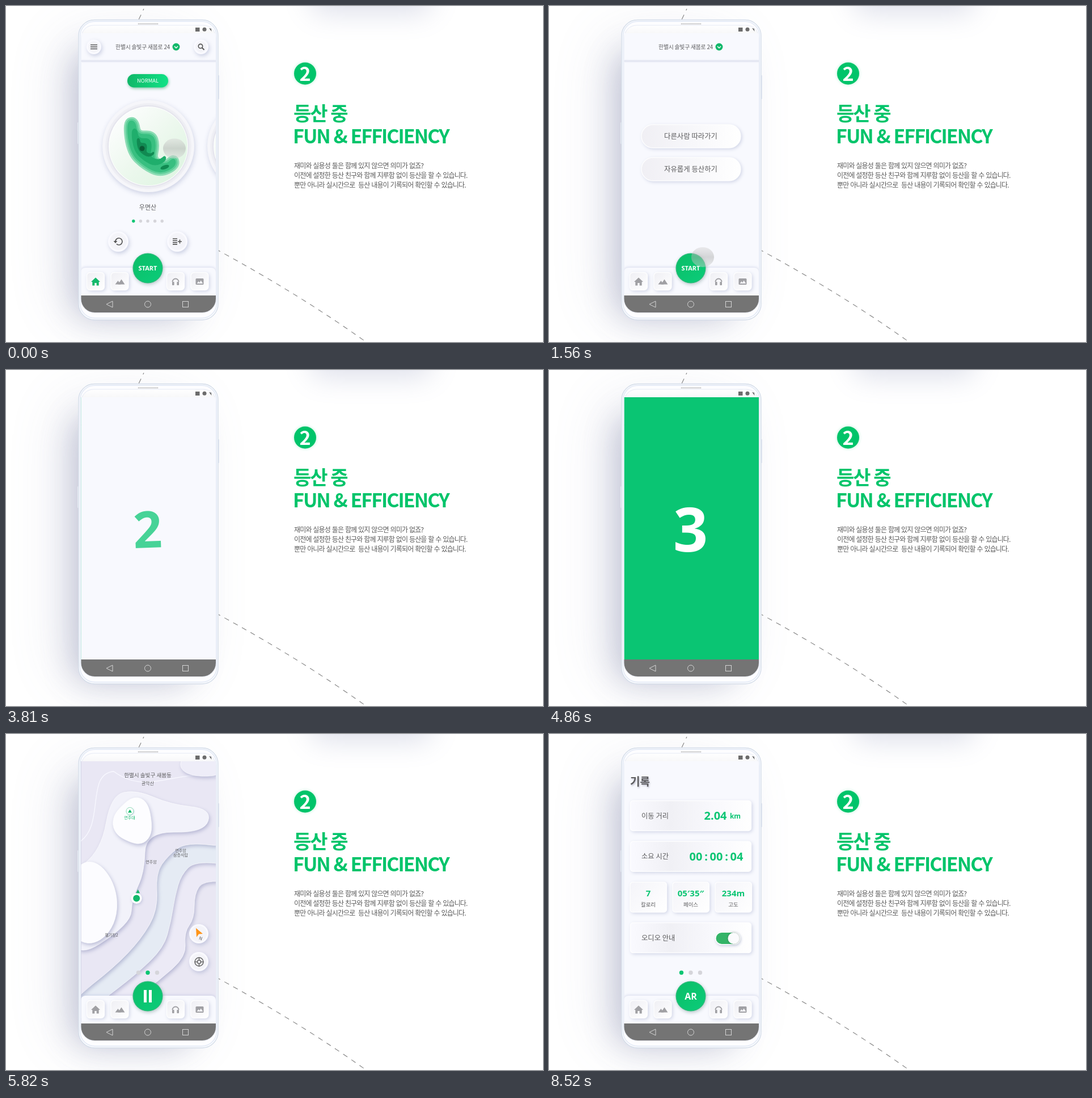
Animation, 947 px wide and 592 px high, one loop 8670 ms. Source, as an HTML page with a canvas:

```html
<!DOCTYPE html>
<html lang="ko">
<head>
<meta charset="utf-8">
<style>
html, body { margin: 0; width: 100%; height: 100%; overflow: hidden; background: #fff; }
canvas { display: block; }
</style>
</head>
<body>
<canvas id="stage" width="947" height="592"></canvas>
<script>
const c = document.getElementById('stage').getContext('2d');
const LOOP = 8670;
const GREEN = '#0ac573', BRAND = '#00c46a', LEAF = '#12b86b';
const GRAY = '#5c5c5e', PALE = '#f8f9fe', ICON = '#a0a0a4', DROP = 'rgba(140,150,190,.42)';
const KR = '"Noto Sans CJK KR", "Noto Sans CJK", sans-serif';
const SANS = '"Noto Sans", sans-serif';
const MID = 250;                                  // centre line of the phone
const VIEW = { x: 132.5, y: 48, w: 237.5, h: 462 };

const clamp = v => Math.max(0, Math.min(1, v));
const span = (t, a, b) => clamp((t - a) / (b - a));
const ease = v => v * v * (3 - 2 * v);
const mix = (a, b, v) => a + (b - a) * v;
const passed = (t, times) => times.filter(x => t >= x).length;

function text(s, x, y, size, color = GRAY, { weight = 400, font = KR, align = 'center', gap = 0, word = 0 } = {}) {
  c.font = `${weight} ${size}px ${font}`;
  c.letterSpacing = gap + 'px';
  c.wordSpacing = word + 'px';
  c.textAlign = align;
  c.fillStyle = color;
  c.fillText(s, x, y + size * 0.37);
}
function shadow(color, blur, dx = 0, dy = 0) {
  c.shadowColor = color; c.shadowBlur = blur; c.shadowOffsetX = dx; c.shadowOffsetY = dy;
}
const noShadow = () => shadow('transparent', 0);
function gradient(x0, y0, x1, y1, ...colors) {
  const g = c.createLinearGradient(x0, y0, x1, y1);
  colors.forEach((col, i) => g.addColorStop(i / (colors.length - 1), col));
  return g;
}
function fill(color) { c.fillStyle = color; c.fill(); }
function stroke(color, width) { c.strokeStyle = color; c.lineWidth = width; c.stroke(); }
function box(x, y, w, h, r, color) { c.beginPath(); c.roundRect(x, y, w, h, r); fill(color); }
function disc(x, y, r, color) { c.beginPath(); c.arc(x, y, r, 0, 7); fill(color); }
function ring(x, y, r, color, width, from = 0, to = 7) { c.beginPath(); c.arc(x, y, r, from, to); stroke(color, width); }
function trace(points) { c.beginPath(); points.forEach(p => c.lineTo(...p)); }
function line(color, width, ...points) { trace(points); stroke(color, width); }
function poly(color, ...points) { trace(points); fill(color); }
function triangle(x, y, w, h, color) { poly(color, [x - w / 2, y + h], [x, y], [x + w / 2, y + h]); }

function raisedBox(x, y, w, h, r, color) {
  shadow(DROP, 6, 2, 2); box(x, y, w, h, r, color); noShadow();
  stroke('rgba(255,255,255,.9)', 1.5);
}
function raisedDisc(x, y, r) {
  shadow(DROP, 7, 2, 3); disc(x, y, r, '#fafaff'); noShadow();
  disc(x, y, r - 3, '#f4f4f9');
}
// Closed curve through the midpoints of a polygon
function smooth(points) {
  const half = i => points[i].map((v, k) => (v + points[(i + 1) % points.length][k]) / 2);
  c.beginPath();
  c.moveTo(...half(points.length - 1));
  points.forEach((p, i) => c.quadraticCurveTo(...p, ...half(i)));
  c.closePath();
}
// Ellipse whose radius swells and shrinks three times per turn
function pebble(x, y, rx, ry, swell, phase) {
  return Array.from({ length: 24 }, (_, i) => {
    const a = i * Math.PI / 12, r = 1 + swell * Math.sin(3 * a + phase);
    return [x + rx * r * Math.cos(a), y + ry * r * Math.sin(a)];
  });
}
function shifted(dx, draw) { c.save(); c.translate(dx, 0); draw(); c.restore(); }

function backdrop() {
  c.fillStyle = '#fff'; c.fillRect(0, 0, 947, 592);
  shadow('rgba(120,125,165,.16)', 100, -35, 5); box(135, 50, 230, 490, 40, '#fff');
  shadow('rgba(110,117,155,.36)', 55, -32, 16); box(150, 65, 210, 470, 30, '#fff');
  shadow('rgba(120,128,170,.25)', 50, 0, 14); box(538, -190, 212, 188, 20, '#fff');
  noShadow();

  c.setLineDash([9, 8.5]);
  c.lineDashOffset = 6;
  line('#808080', 1.1, [243, 5], [234, 24]);
  c.beginPath(); c.moveTo(375, 431); c.quadraticCurveTo(520, 510, 635, 592); stroke('#808080', 1.1);
  c.setLineDash([]);

  shadow('rgba(0,196,106,.3)', 5); disc(527.5, 119, 19.5, BRAND); noShadow();
  text('2', 527.5, 119, 34, '#fff', { weight: 700 });
  const head = { weight: 700, align: 'left', gap: -2, word: 1 };
  text('등산 중', 507, 189, 34, BRAND, head);
  text('FUN & EFFICIENCY', 506, 229.5, 34, BRAND, head);
  ['재미와 실용성 둘은 함께 있지 않으면 의미가 없죠?',
   '이전에 설정한 등산 친구와 함께 지루함 없이 등산을 할 수 있습니다.',
   '뿐만 아니라 실시간으로  등산 내용이 기록되어 확인할 수 있습니다.'
  ].forEach((s, i) => text(s, 508, 282 + 17 * i, 12, '#5a5a5a', { align: 'left', gap: -0.85, word: 0.95 }));
}

function phone() {
  box(126, 205, 3, 38, 1, '#e6eaf2');
  box(373, 122, 3, 42, 1, '#e0e6f0');
  box(128, 24.5, 246, 528.5, 28, '#fff'); stroke('#d3dce9', 1.3);
  box(130.5, 27, 241, 523, 26, '#fdfdff'); stroke('#e6ecf7', 2);
  box(132.5, 34, 237.5, 506, 22, gradient(0, 34, 0, 50, '#fff', '#f7f7f8')); stroke('#dfe4f1', 0.8);
  c.lineDashOffset = 0;
  c.setLineDash([1, 1]); line('#888', 1.5, [233, 31.5], [268, 31.5]); c.setLineDash([]);
  box(334, 38, 7.5, 7, 0, '#6c6c6c');
  disc(350, 41.3, 3.5, '#6c6c6c');
  poly('#6c6c6c', [358, 39], [362, 40], [362.5, 45]);
  box(132.5, 510, 237.5, 30, [0, 0, 24, 24], '#747474');
  trace([[188, 520], [177, 525.5], [188, 531]]); c.closePath(); stroke('#d4d4d4', 1);
  ring(MID, 525.5, 5.5, '#d4d4d4', 1);
  c.strokeRect(311.5, 520.5, 10, 10);
}

function header() {
  c.fillStyle = PALE; c.fillRect(132, 48, 238, 462);
  c.fillStyle = gradient(0, 94, 0, 100, PALE, '#dfe2ef', PALE); c.fillRect(132, 94, 238, 6);
  text('한별시 솔빛구 새봄로 24', 241, 72, 9.8, GRAY, { gap: -0.2 });
  disc(300, 72, 6.5, LEAF);
  line('#fff', 1.5, [297, 71], [300, 74], [303, 71]);
}

function tabs(homeColor = ICON) {
  shadow('rgba(150,160,200,.35)', 4, 0, -1);
  box(132, 461, 238, 52, [8, 8, 0, 0], PALE);
  noShadow();
  for (const dx of [-92, -49.5, 49, 91.5]) {
    const x = MID + dx;
    raisedBox(x - 15.5, 469.5, 31, 31, 6, gradient(x - 15, 470, x + 15, 500, '#efeff4', '#fff'));
  }
  triangle(158, 478.5, 16, 7.5, homeColor);
  box(152.3, 485, 4, 7.5, 0, homeColor); box(159.7, 485, 4, 7.5, 0, homeColor); box(154, 485, 8, 3, 0, homeColor);
  triangle(197.5, 484, 10, 6.5, ICON); triangle(203.5, 481.5, 12, 9, ICON);
  ring(299, 486, 5.5, ICON, 1.8, Math.PI, 0);
  box(293, 486, 3.6, 6, 1, ICON); box(301.4, 486, 3.6, 6, 1, ICON);
  box(334.5, 480, 14, 11, 1.5, ICON);
  triangle(339.5, 485, 6, 4, '#f4f4f8'); triangle(343.7, 483.5, 7, 5.5, '#f4f4f8');
}

function mainButton(label, size = 11) {
  shadow('rgba(70,110,110,.4)', 6, 1, 2); disc(MID, 462, 26.5, '#25bd77'); noShadow();
  disc(MID, 462, 25, gradient(230, 440, 268, 485, '#0bbf69', '#0bcb78'));
  if (label) return text(label, MID, 462, size, '#fff', { weight: 700, font: SANS });
  box(243, 451, 5, 22, 0, '#fff'); box(252, 451, 5, 22, 0, '#fff');
}

function pageDots(active, count, gap, y, r) {
  for (let i = 0; i < count; i++)
    disc(MID + (i - (count - 1) / 2) * gap, y, r, i === active ? GREEN : '#d5d5da');
}

function dial(x) {
  shadow(DROP, 8, 1, 3); disc(x, 247, 81, '#f6f6fa'); noShadow();
  disc(x, 247, 76, '#f0f0f5');
  shadow('rgba(150,150,180,.4)', 4); disc(x, 247, 70, '#fff'); noShadow();
  disc(x, 247, 69, gradient(x - 50, 200, x + 50, 300, '#fbfdfc', '#edf8ee', '#e0f5e3'));
}

// Height steps: the same outline with ever thinner rims, then scaled towards the peak
function mountain() {
  const outline = [[213, 205], [227, 202], [231, 228], [258, 226], [264, 245], [258, 272],
    [282, 281], [297, 267], [299, 282], [272, 295], [245, 282], [220, 258]];
  const steps = [['#8cdcb4', 15, 1], ['#5ecf99', 9, 1], ['#38bf80', 3, 1], ['#1fae6c', 1, 0.72], ['#118a52', 1, 0.36]];
  c.lineJoin = 'round';
  for (const [color, rim, size] of steps) {
    smooth(outline.map(([x, y]) => [mix(240, x, size), mix(250, y, size)]));
    fill(color); stroke(color, rim);
  }
  disc(240, 251, 4.5, '#0a5a35');
  c.beginPath(); c.ellipse(280, 284, 8, 3.5, -0.35, 0, 7); fill('#118a52');
}

function homePage() {
  header();
  raisedDisc(155, 72, 13); raisedDisc(344, 72, 13);
  for (const dy of [-3.5, 0, 3.5]) line('#555', 1.5, [149, 72 + dy], [161, 72 + dy]);
  ring(343, 70.8, 3.7, '#555', 1.6);
  line('#555', 2, [345.6, 73.4], [349.5, 77.3]);

  shadow('rgba(30,150,90,.5)', 5, 1, 2);
  box(214, 120, 72, 23.5, 12, gradient(214, 0, 286, 0, '#10b768', '#10e286'));
  noShadow();
  text('NORMAL', MID, 132, 9.4, '#fff', { weight: 500 });

  dial(436); dial(251);
  mountain();
  text('우면산', MID, 355, 11);
  pageDots(0, 5, 12.6, 379, 2.7);

  raisedDisc(198, 415, 18); raisedDisc(302, 415, 18);
  ring(199, 415, 6, '#555', 1.7, 3.1, 8.6);
  triangle(193, 418, 7, -4, '#555');
  for (let i = 0; i < 4; i++) line('#555', 1.6, [294, 410 + 3.3 * i], [302, 410 + 3.3 * i]);
  line('#555', 1.6, [303, 415], [310, 415]);
  line('#555', 1.6, [306.5, 411.5], [306.5, 418.5]);
  tabs(LEAF);
  mainButton('START');
}

function choicePage(pressed) {
  header();
  ['다른사람 따라가기', '자유롭게 등산하기'].forEach((s, i) => {
    const y = 209 + 58 * i, on = pressed && i;
    const shades = on ? ['#f4f5fb', '#dfe2ee', '#e6e9f3'] : ['#f0eff4', '#f7f7fa', '#fff'];
    raisedBox(163, y, 175, 41, 20.5, gradient(163, 0, 338, 0, ...shades));
    text(s, MID, y + 20, 12.4, on ? GREEN : GRAY, { weight: 500 });
  });
  tabs();
  mainButton('START');
}

function layer(points, color) {
  shadow('rgba(125,130,175,.5)', 7, 2, 3);
  smooth(points); fill(color);
  noShadow();
  stroke('rgba(255,255,255,.65)', 1);
}

// Slopes are steps between the lowest and the highest contour
function slopes() {
  const low = [[410, 262], [348, 258], [332, 282], [332, 325], [314, 350], [318, 392], [268, 436], [215, 475]];
  const high = [[410, 202], [318, 190], [286, 214], [264, 245], [268, 310], [238, 362], [190, 412], [115, 470]];
  ['#eceaf6', '#e5ebf4', '#e9e7f4'].forEach((color, i) => {
    const edge = low.map(([x, y], k) => [mix(x, high[k][0], i / 2), mix(y, high[k][1], i / 2)]);
    layer([[60, 560], [60, -60], [460, -60], ...edge], color);
  });
}

function mapPage() {
  c.fillStyle = '#e9e7f3'; c.fillRect(132, 48, 238, 462);
  slopes();
  c.beginPath(); c.moveTo(130, 190);
  c.bezierCurveTo(175, 160, 140, 70, 190, 66);
  c.bezierCurveTo(250, 110, 300, 60, 372, 76);
  stroke('#f8f8ff', 1.3);
  layer(pebble(350, 50, 42, 26, 0.06, 0), '#eeedf8');
  layer([[110, 250], [168, 205], [185, 108], [230, 98], [290, 124], [363, 132], [350, 174], [246, 172],
    [244, 245], [222, 290], [220, 335], [110, 405]], '#f2f2fa');
  layer(pebble(225, 154, 34, 40, 0.09, 5.2), '#fdfdff');
  layer(pebble(150, 298, 45, 72, 0.03, 1), '#fcfcff');

  text('한별시 솔빛구 새봄동', MID, 72, 9.6);
  text('관악산', MID, 87, 8, GRAY, { weight: 500 });
  shadow(DROP, 3, 1, 1); disc(218.5, 136, 6.5, '#fff'); noShadow();
  stroke('#74d7a8', 0.8);
  triangle(218.5, 133, 7, 5.5, LEAF);
  text('연주대', 218, 147.5, 7, LEAF, { weight: 500 });
  text('연주암', 256, 225, 7);
  text('연주암', 308, 205.5, 7);
  text('삼층석탑', 308, 213.5, 7);
  text('헬기장2', 186, 354, 7);

  raisedDisc(340, 352, 17); raisedDisc(340, 401, 17);
  poly('#ff9417', [335, 342], [347, 352], [340, 352.5], [336, 358]);
  c.save(); c.translate(343.5, 360); c.rotate(0.3); text('N', 0, 0, 8, '#555', { weight: 500 }); c.restore();
  ring(340.5, 401.5, 7.5, '#666', 1.5);
  ring(340.5, 401.5, 3, '#666', 1.5);
  for (let a = 0; a < 6; a += Math.PI / 2)
    line('#666', 1.5, ...[3, 8].map(r => [340.5 + r * Math.cos(a), 401.5 + r * Math.sin(a)]));
}

function marker(t) {
  const y = mix(mix(445, 327, span(t, 5190, 5520)), 150, span(t, 5700, 6270));
  const x = 221 + 41 * ((y - 150) / 295) ** 2;
  shadow(DROP, 5, 1, 2); disc(x, y, 9.5, '#fff'); noShadow();
  disc(x, y, 6, LEAF);
  triangle(x + 2.5, y - 15.5, 7, 6.5, LEAF);
}

function recordPage(t) {
  const left = { align: 'left' }, bold = { weight: 700, font: SANS };
  const wide = gradient(143, 0, 357, 0, '#fafaff', '#f0f0f5', '#f8f8fc', '#fff');
  c.fillStyle = PALE; c.fillRect(132, 48, 238, 462);
  shadow('rgba(100,100,130,.4)', 3, 1, 2);
  text('기록', 143, 84, 19, GRAY, { weight: 700, align: 'left' });
  noShadow();
  ['이동 거리', '소요 시간', '', '오디오 안내'].forEach((label, i) => {
    const y = 117.5 + 71.7 * i;
    if (label) raisedBox(143.5, y, 213, 53, 5, wide);
    text(label, 163, y + 26.5, 12.3, GRAY, left);
  });
  text('2.04', 293.5, 143.5, 20, GREEN, bold);
  text('km', 328.5, 145, 12, GREEN, bold);
  const seconds = 2 + passed(t, [7620, 8520]);
  ['00', ':', '00', ':', '0' + seconds].forEach((s, i) => text(s, 259 + 18 * i, 216, 20, GREEN, bold));
  const calories = 4 + passed(t, [7320, 7830, 8370]);
  [[calories, '칼로리'], ['05′35″', '페이스'], ['234m', '고도']].forEach(([value, label], i) => {
    const x = 143 + 75 * i;
    raisedBox(x, 261, 64.5, 53, 5, gradient(x, 261, x + 64, 314, '#f4f4f9', '#fff'));
    text(value, x + 32, 280, 15, GREEN, bold);
    text(label, x + 32, 300, 9.5);
  });
  shadow(DROP, 4, 1, 2); box(293, 348.5, 45, 23, 11.5, '#fff'); noShadow();
  box(294.5, 350, 40, 20, 10, '#33b467');
  shadow('rgba(60,90,80,.5)', 4); disc(325.5, 360, 10, '#fbfbfd'); noShadow();
}

function trackPages(t) {
  const k = ease(span(t, 6420, 6780)), onRecord = k > 0.5;
  if (k < 1) shifted(238 * k, mapPage);
  if (k > 0) shifted(238 * (k - 1), () => recordPage(t));
  pageDots(onRecord ? 0 : 1, 3, 16.5, 420.5, 3.7);
  tabs();
  mainButton(onRecord ? 'AR' : '', 16);
  if (k < 1) shifted(238 * k, () => marker(t));
}

function cover(color, alpha) {
  c.globalAlpha = alpha; c.fillStyle = color;
  c.fillRect(VIEW.x, VIEW.y, VIEW.w, VIEW.h);
  c.globalAlpha = 1;
}
function digit(s, color, k, fade = 1) {
  const size = mix(0.73, 1, k);
  c.save();
  c.translate(249.5, 280);
  c.rotate(-0.06 * (1 - k));
  c.scale(size, size);
  c.globalAlpha = clamp(k * 1.9) * fade;
  text(s, 0, 0, 107, color, { weight: 700, font: SANS });
  c.restore();
}
function countdown(t) {
  if (t < 3600) {
    cover(GREEN, span(t, 2700, 3270) ** 2);
    digit('1', '#fff', span(t, 2910, 3420));
  } else if (t < 4320) {
    const k = span(t, 3570, 3750);
    cover(GREEN, 1); cover(PALE, k);
    digit('1', '#fff', 1, 1 - k);
    digit('2', GREEN, span(t, 3600, 4140));
  } else {
    const k = span(t, 4290, 4470), out = 1 - span(t, 4920, 5160);
    if (t < 4920) cover(PALE, 1);
    cover(GREEN, k * out);
    digit('2', GREEN, 1, 1 - k);
    digit('3', '#fff', span(t, 4320, 4830), out);
  }
}

function cursor(t) {
  const a = ease(span(t, 0, 870)), b = ease(span(t, 1530, 2400));
  const x = mix(mix(297, 271, a), 280, b), y = mix(mix(251, 443, a), 290, b);
  c.globalAlpha = 1 - span(t, 2400, 2580);
  c.beginPath(); c.ellipse(x, y, 20, 17.5, 0, 0, 7);
  fill(gradient(0, y - 18, 0, y + 18, 'rgba(215,213,213,.45)', 'rgba(175,176,175,.5)', 'rgba(215,215,215,.45)'));
  c.globalAlpha = 1;
}

function screen(t) {
  c.save();
  c.beginPath(); c.rect(VIEW.x, VIEW.y, VIEW.w, VIEW.h); c.clip();
  if (t < 990) homePage();
  else if (t < 4920) choicePage(t >= 2430);
  else trackPages(t);
  if (t < 2580) cursor(t);
  if (t >= 2700 && t < 5160) countdown(t);
  c.restore();
}

const start = performance.now();
(function tick() {
  backdrop();
  phone();
  screen((performance.now() - start) % LOOP);
  requestAnimationFrame(tick);
})();
</script>
</body>
</html>
```
